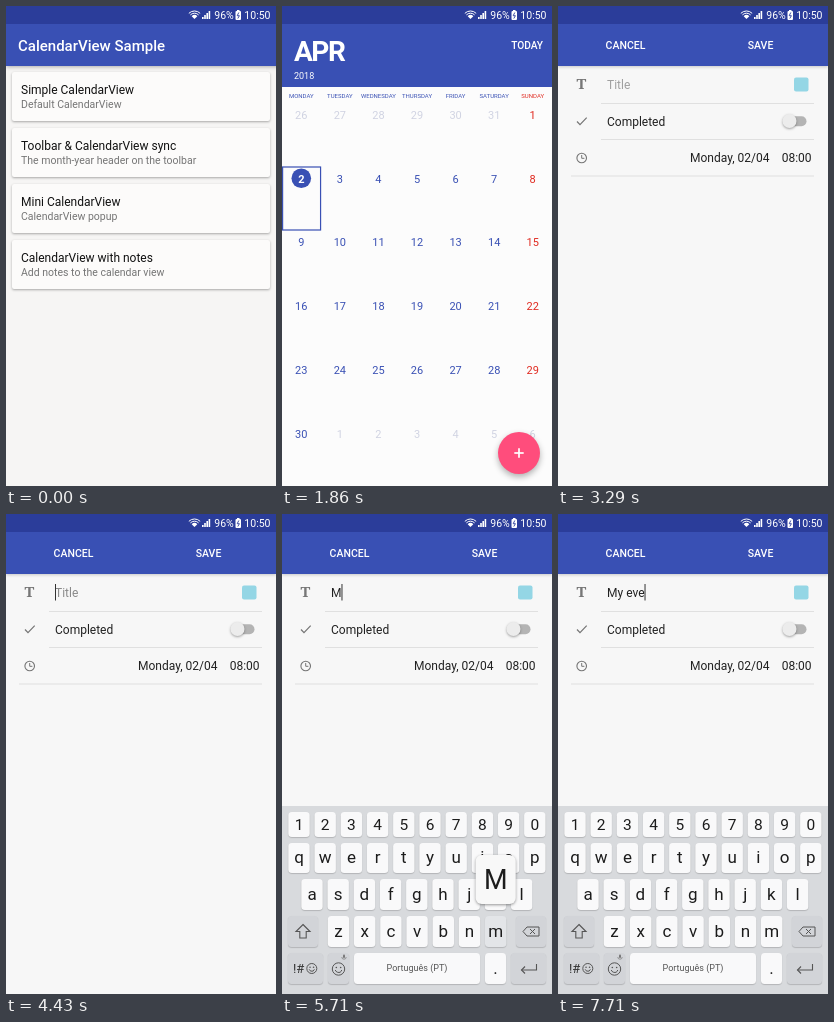
Recreate the animation shown at these times as an HTML page with a canvas. Size 270x480 px, loop 8 s.

```html
<!DOCTYPE html>
<html lang="en">
<head>
<meta charset="utf-8">
<title>Calendar notes demo</title>
<style>
html, body { margin: 0; width: 100%; height: 100%; overflow: hidden; }
canvas { display: block; width: 100vw; height: 100vh; }
</style>
</head>
<body>
<canvas id="stage"></canvas>
<script>
const W = 270, H = 480, LOOP = 8000, FPS = 7;
const BLUE = '#3950b4', DARK = '#2b3d9a', INK = '#212121', GREY = '#757575';
const canvas = document.getElementById('stage');
const c = canvas.getContext('2d');

const CARDS = [
  ['Simple CalendarView', 'Default CalendarView'],
  ['Toolbar & CalendarView sync', 'The month-year header on the toolbar'],
  ['Mini CalendarView', 'CalendarView popup'],
  ['CalendarView with notes', 'Add notes to the calendar view']
];
const WEEK = ['MONDAY', 'TUESDAY', 'WEDNESDAY', 'THURSDAY', 'FRIDAY', 'SATURDAY', 'SUNDAY'];

// Key rows: characters, first key centre, top, height
const ROWS = [
  ['1234567890', 17, 298, 25],
  ['qwertyuiop', 17, 329, 30],
  ['asdfghjkl', 30, 365, 31],
  ['zxcvbnm', 56.5, 402, 31]
];
const KEY_STEP = 26.2;

// Typing: step pressed, key, resulting text
const STROKES = [
  [40, 'm', 'M'], [43, 'y', 'My'], [45, ' ', 'My '],
  [49, 'e', 'My e'], [51, 'v', 'My ev'], [53, 'e', 'My eve']
];

const clamp = v => Math.min(1, Math.max(0, v));
const remaining = (t, start, length) => Math.pow(1 - clamp((t - start) / length), 3);

function rect(x, y, w, h, fill) {
  c.fillStyle = fill;
  c.fillRect(x, y, w, h);
}

function round(x, y, w, h, r, fill) {
  c.fillStyle = fill;
  c.beginPath();
  c.roundRect(x, y, w, h, r);
  c.fill();
}

function disc(x, y, r, fill) {
  c.fillStyle = fill;
  c.beginPath();
  c.arc(x, y, r, 0, Math.PI * 2);
  c.fill();
}

function text(s, x, y, size, fill, align = 'left', weight = 400, family = 'Roboto, sans-serif') {
  c.font = `${weight} ${size}px ${family}`;
  c.textAlign = align;
  c.fillStyle = fill;
  c.fillText(s, x, y);
}

function line(points, color, width = 1, close = false) {
  c.strokeStyle = color;
  c.lineWidth = width;
  c.beginPath();
  points.forEach(([x, y], i) => i ? c.lineTo(x, y) : c.moveTo(x, y));
  if (close) c.closePath();
  c.stroke();
}

function ring(x, y, r, color, from = 0, to = Math.PI * 2, width = 1) {
  c.strokeStyle = color;
  c.lineWidth = width;
  c.beginPath();
  c.arc(x, y, r, from, to);
  c.stroke();
}

function shadowed(blur, dy, alpha, draw) {
  c.save();
  c.shadowColor = `rgba(0,0,0,${alpha})`;
  c.shadowBlur = blur * canvas.width / W;
  c.shadowOffsetY = dy * canvas.width / W;
  draw();
  c.restore();
}

function shifted(x, y, draw) {
  c.save();
  c.translate(x, y);
  draw();
  c.restore();
}

function statusBar() {
  rect(0, 0, W, 18, DARK);
  c.fillStyle = '#fff';
  c.beginPath();
  c.moveTo(188.5, 13);
  c.arc(188.5, 13, 4, -Math.PI * 0.75, -Math.PI * 0.25);
  c.fill();
  for (const r of [5.8, 8]) ring(188.5, 13, r, '#fff', -Math.PI * 0.75, -Math.PI * 0.25);
  for (let i = 0; i < 4; i++) rect(196 + i * 2.2, 11 - i * 2, 1.6, 2 + i * 2, '#fff');
  text('96%', 208.3, 13, 10.5, '#fff');
  round(229.5, 5, 5.5, 9, 1, '#fff');
  rect(231, 4, 2.5, 1, '#fff');
  line([[232.8, 6.5], [231.2, 9.7], [233.4, 9.7], [231.8, 12.5]], DARK, 0.9);
  text('10:50', 264.5, 13, 10.5, '#fff', 'right');
}

function listPage(t) {
  rect(0, 18, W + 10, H, '#f6f5f4');
  shadowed(4, 1, 0.3, () => rect(0, 18, W + 10, 42, BLUE));
  text('CalendarView Sample', 12, 45, 15, '#fff', 'left', 500);
  CARDS.forEach(([title, note], i) => {
    const y = 66 + i * 56;
    shadowed(2.5, 1, 0.32, () => round(6, y, 258, 49, 2, '#fcfbfa'));
    if (i === 3) ripple(t, y);
    text(title, 15, y + 21.7, 12, '#111');
    text(note, 15, y + 36, 10.5, GREY);
  });
}

function ripple(t, y) {
  const p = clamp((t - 780) / 620);
  if (!p) return;
  c.save();
  c.beginPath();
  c.roundRect(6, y, 258, 49, 2);
  c.clip();
  rect(6, y, 258, 49, `rgba(30,35,45,${0.05 * clamp(p * 3)})`);
  disc(135, y + 25, 20 + 150 * p, 'rgba(30,35,45,0.035)');
  c.restore();
}

function calendarPage(step) {
  rect(0, 18, W, H, '#fcfcfc');
  rect(0, 18, W, 63, BLUE);
  if (step < 12) rect(0, 64, W, 17, DARK);
  c.letterSpacing = '-1.5px';
  text('APR', 12, 54.5, 28, '#fff', 'left', 700);
  c.letterSpacing = '0px';
  text('2018', 12, 73.3, 9, '#fff');
  text('TODAY', 261, 43, 10.2, '#fff', 'right', 500);

  const col = W / 7, row = 63.7;
  WEEK.forEach((name, i) =>
    text(name, col * (i + 0.5), 92, 6, i === 6 ? '#e02a20' : BLUE, 'center'));
  for (let i = 0; i < 42; i++) {
    const day = new Date(2018, 2, 26 + i);
    const x = col * (i % 7 + 0.5), y = 109 + Math.floor(i / 7) * row;
    const now = day.getMonth() === 3, picked = i === 7;
    if (picked) {
      c.strokeStyle = BLUE;
      c.lineWidth = 1.2;
      c.strokeRect(0.6, 161, col - 0.6, 63);
      disc(x, y - 0.4, 9.8, BLUE);
    }
    const color = picked ? '#fff' : !now ? '#d0d3e2' : i % 7 === 6 ? '#e02a20' : BLUE;
    text(day.getDate(), x, y + 4, 11, color, 'center', picked ? 700 : 400);
  }

  shadowed(6, 3, 0.3, () => disc(237, 447, 21, '#ff4d7c'));
  if (step >= 18) disc(237, 447, step > 18 ? 21 : 15, 'rgba(255,255,255,0.22)');
  line([[232.3, 447], [241.7, 447]], '#fff', 1.7);
  line([[237, 442.3], [237, 451.7]], '#fff', 1.7);
}

function notePage(title, caret, focused) {
  rect(0, 0, W, H, '#f7f7f7');
  shadowed(3, 1, 0.2, () => rect(0, 18, W, 42, BLUE));
  rect(0, 0, W, 18, DARK);
  text('CANCEL', 67.5, 43, 10.5, '#fff', 'center', 500);
  text('SAVE', 202.5, 43, 10.5, '#fff', 'center', 500);

  text('T', 23.5, 83.3, 15, '#777', 'center', 700, '"Noto Serif", serif');
  text(title || 'Title', 49, 83, 12, title ? INK : focused ? '#8a8a8a' : '#a0a0a0');
  if (caret) {
    c.font = '400 12px Roboto, sans-serif';
    rect(49 + c.measureText(title).width, 70, 1, 16.5, '#333');
  }
  round(236, 71.5, 14.5, 14, 2, '#94d6e5');

  line([[19, 115.5], [22, 118.7], [28.7, 111.7]], GREY, 1.2);
  text('Completed', 49, 119.5, 12, INK);
  round(228, 110.2, 20.5, 10, 5, '#b4b4b4');
  shadowed(2.5, 1, 0.35, () => disc(231.5, 115, 7, '#ececec'));

  ring(23.7, 152, 4.8, GREY, 0, Math.PI * 2, 1.1);
  line([[23.7, 149], [23.7, 152.3], [26.4, 152.3]], GREY, 1);
  text('Monday, 02/04', 132, 156.3, 12, INK);
  text('08:00', 223.7, 156.3, 12, INK);

  rect(43, 97, 213, 1, '#e0e0e0');
  rect(43, 133, 213, 1, '#e0e0e0');
  rect(13, 169.5, 243, 1, '#e0e0e0');
}

function key(x, y, w, h, fill) {
  shadowed(1, 0.8, 0.22, () => round(x, y, w, h, 3.5, fill));
}

function smiley(x, y, r) {
  ring(x, y, r, '#555');
  disc(x - r * 0.35, y - r * 0.25, 0.8, '#555');
  disc(x + r * 0.35, y - r * 0.25, 0.8, '#555');
  ring(x, y, r * 0.55, '#555', 0.3, Math.PI - 0.3);
}

function keyboard(upper, shiftDown, pressed) {
  const plain = '#f9f9fa', special = '#d2d4d8', down = '#b9bdc3';
  rect(0, 292, W, 200, '#d8dadd');
  let popup = null;
  ROWS.forEach(([chars, first, top, h], r) => {
    [...chars].forEach((ch, i) => {
      const x = first + i * KEY_STEP, hit = ch === pressed;
      key(x - 10.7, top, 21.4, h, hit ? '#e3e5e8' : plain);
      text(upper ? ch.toUpperCase() : ch, x, top + h / 2 + (r ? 5.3 : 5.5),
        r ? 17 : 15.5, '#1c1c1c', 'center');
      if (hit) popup = [x, top];
    });
  });

  key(6, 402, 30, 31, shiftDown ? down : special);
  const arrow = [[21, 410.5], [28, 417.5], [24.2, 417.5], [24.2, 424], [17.8, 424], [17.8, 417.5], [14, 417.5]];
  line(arrow, upper ? '#2f7fd0' : '#555', 1.1, true);
  if (upper) {
    c.fillStyle = '#2f7fd0';
    c.fill();
  }

  key(234, 402, 30, 31, special);
  line([[241, 417.5], [245, 413], [257, 413], [257, 422], [245, 422]], '#555', 1, true);
  line([[248, 415], [253, 420]], '#555');
  line([[253, 415], [248, 420]], '#555');

  key(6, 439, 35, 31, special);
  text('!#', 11, 459, 13, '#333');
  smiley(29.8, 454.5, 5);
  key(46, 439, 21, 31, special);
  smiley(56.5, 455, 6.2);
  round(61, 440.5, 2, 3.6, 1, '#777');
  ring(62, 443, 2.2, '#777', 0, Math.PI, 0.7);
  key(72, 439, 126, 31, pressed === ' ' ? '#dcdfe3' : plain);
  text('Português (PT)', 135, 457.3, 9, '#555', 'center');
  key(203, 439, 21, 31, plain);
  text('.', 213.5, 460, 17, '#1c1c1c', 'center');
  key(229, 439, 35, 31, special);
  line([[254.5, 450], [254.5, 456], [239.5, 456]], '#555', 1.1);
  line([[243, 452.5], [239.5, 456], [243, 459.5]], '#555', 1.1);

  if (popup) {
    const [x, top] = popup;
    const left = Math.min(W - 42, Math.max(2, x - 20));
    shadowed(3, 1, 0.4, () => round(left, top - 61, 40, 49, 6, '#f8f8f8'));
    text(upper || pressed === 'm' ? pressed.toUpperCase() : pressed,
      left + 20, top - 27, 27, '#1c1c1c', 'center');
  }
}

function draw(now) {
  const step = Math.floor((now % LOOP) / 1000 * FPS + 0.05);
  const t = step * 1000 / FPS;
  const slide = W * remaining(t, 1405, 430);
  const rise = H * remaining(t, 2608, 520);
  const stroke = STROKES.filter(s => s[0] <= step).pop();

  c.setTransform(canvas.width / W, 0, 0, canvas.height / H, 0, 0);
  if (slide > 0) shifted((slide - W) * 0.025, 0, () => listPage(t));
  if (slide < W && rise > 0) {
    shifted(slide, 0, () => calendarPage(step));
  }
  if (rise < H) {
    const caret = step >= 31 && (step < 35 || step >= 38);
    shifted(0, rise, () => notePage(stroke ? stroke[2] : '', caret, step >= 31));
  }
  statusBar();

  const sink = 188 * remaining(t, 4490, 430);
  if (sink < 188) {
    const pressed = stroke && stroke[0] === step ? stroke[1] : '';
    shifted(0, sink, () => keyboard(step === 38 || step === 39, step === 37, pressed));
  }
}

function fit() {
  const d = window.devicePixelRatio || 1;
  canvas.width = Math.round(innerWidth * d);
  canvas.height = Math.round(innerHeight * d);
}

const begin = performance.now();
function tick() {
  draw(performance.now() - begin);
  requestAnimationFrame(tick);
}
addEventListener('resize', fit);
fit();
tick();
</script>
</body>
</html>
```
